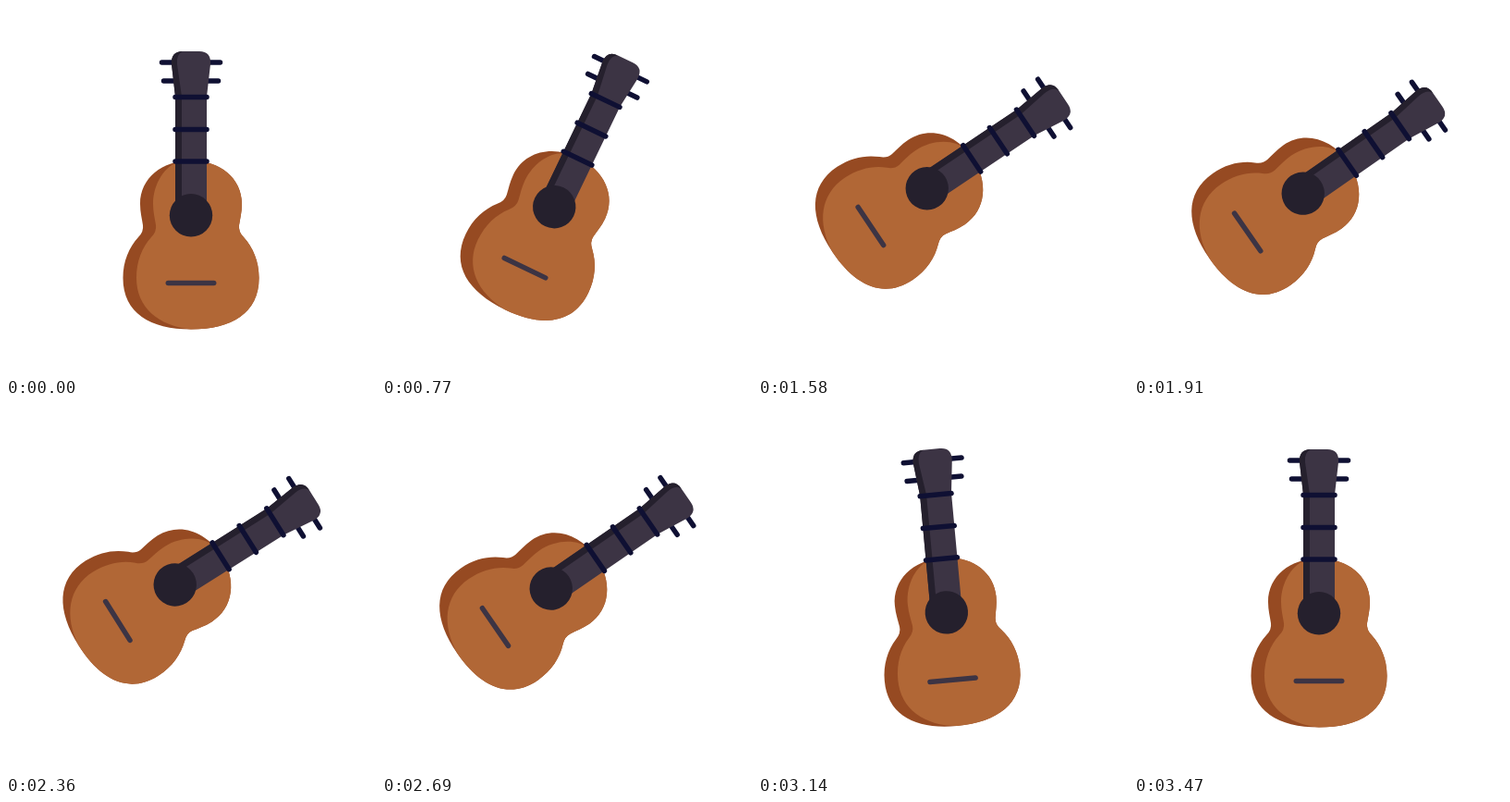
An HTML page without scripts for the animation above (3530 ms loop, 400 px wide and 400 px high).

```html
<!DOCTYPE html>
<html lang="en">
<head>
<meta charset="utf-8">
<title>Strumming guitar</title>
<style>
  @property --lift { syntax: "<number>"; inherits: false; initial-value: 0; }
  @property --rise { syntax: "<number>"; inherits: false; initial-value: 0; }
  @property --beat { syntax: "<angle>"; inherits: false; initial-value: 0deg; }

  html, body { margin: 0; width: 100%; height: 100%; overflow: hidden; background: #fff; }
  svg { display: block; width: 100vw; height: 100vh; }

  /* lift tilts the guitar along a bowed path, rise raises it, beat drives the strumming. */
  .guitar {
    --x: calc(-1px * var(--lift) * (17 + 23.5 * (1 - var(--lift))));
    --y: calc(-1px * var(--rise) * (26.5 + 4.3 * cos(var(--beat) + 120deg)));
    --tilt: calc(1deg * var(--lift) * (57.1 - 2 * cos(var(--beat))));
    transform: translate(var(--x), var(--y)) rotate(var(--tilt));
    transform-origin: 200px 226px;
    animation: 3530ms infinite;
    animation-name: lift, rise, beat;
    animation-timing-function: ease-in-out, ease-in-out, linear;
  }
  @keyframes lift {
    0%, 14.16% { --lift: 0; }
    30.3% { --lift: 1; }
    80.9% { --lift: 1; animation-timing-function: cubic-bezier(.5, 0, .5, 1); }
    90.1% { --lift: -.114; }
    98.3%, 100% { --lift: 0; }
  }
  @keyframes rise {
    0%, 15.3% { --rise: 0; }
    32%, 80.9% { --rise: 1; }
    90.1%, 100% { --rise: 0; }
  }
  @keyframes beat { to { --beat: 13turn; } }

  .shade { fill: #964a22; }
  .wood { fill: #b16736; }
  .neck { fill: #3c3444; }
  .dark { fill: #25202d; }
  .line { fill: none; stroke: #0f1033; stroke-width: 5.5; stroke-linecap: round; }
  .bridge { stroke: #3c3444; }
</style>
</head>
<body>
<svg viewBox="0 0 400 400">
  <g class="guitar">
    <path class="shade" d="M200 167C231 167 255 186 255 214C255 223 253 230 252 237Q251 244 257 250C267 261 273.5 276 273.5 294C273.5 332 244 349.5 200 349.5C156 349.5 126.5 332 126.5 294C126.5 276 133 261 143 250Q149 244 148 237C147 230 145 223 145 214C145 186 169 167 200 167Z"/>
    <path class="wood" d="M200 167C231 167 255 186 255 214C255 223 253 230 252 237Q251 244 257 250C267 261 273.5 276 273.5 294C273.5 332 244 349.5 200 349.5C165 346 141 326 141 294C141 276 147 261 157 250Q163 244 162 237C161 230 159 223 159 214C159 192 172 172 188 168Z"/>
    <path class="line" d="M168.5 61H231.5M170.5 81H229.5"/>
    <path class="neck" d="M183 226V98L179 63Q178 49 191 49H209Q222 49 221 63L217 98V226Z"/>
    <path class="dark" d="M183 226V98L179 63Q178 49 191 49Q184 52 185 63L190 98V226Z"/>
    <path class="line" d="M183 98.5H217M183 133.5H217M183 168H217"/>
    <circle class="dark" cx="200" cy="226.3" r="23.2"/>
    <path class="line bridge" d="M175.3 299.5H224.7"/>
  </g>
</svg>
</body>
</html>
```
